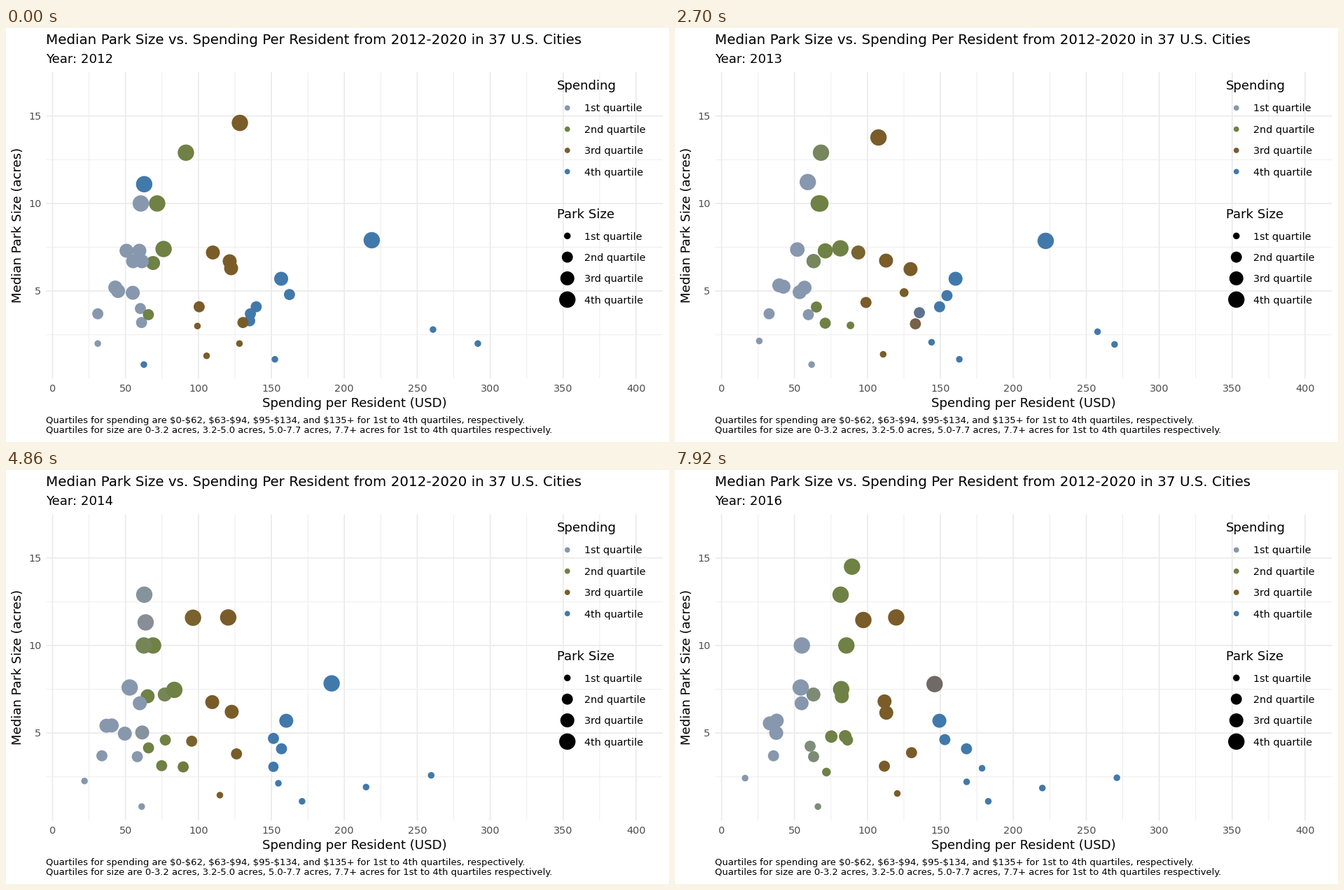
Write a matplotlib script that moves like this. It is 947 by 592 pixels and loops after 8000 ms.

```python
import numpy as np
import matplotlib.pyplot as plt
from matplotlib.animation import FuncAnimation
from matplotlib.collections import LineCollection

WIDTH, HEIGHT, DPI = 947, 592, 64
PT = 72 / DPI                      # points per pixel
INTERVAL, LOOP, STEP = 40, 8000, 180
KEY_STEPS = [0, 12, 25, 37, 50]    # steps at which a calendar year is reached
YEARS = np.arange(5)
COLORS = [(135, 151, 174), (111, 129, 68), (122, 92, 41), (65, 121, 171)]
RADII = np.array([4.75, 7.93, 10.0, 11.7])
QUARTILES = ["1st quartile", "2nd quartile", "3rd quartile", "4th quartile"]
TITLE, BASE, SMALL, CAPTION = 19.93, 18.1, 14.34, 13.15    # text sizes in pixels

plt.rcParams["font.family"] = "DejaVu Sans"

cities = []


def city(x, y, drift, *jumps, swing=0, rise=0):
    """Start at (x, y), drift and rise steadily, swing out and back once.

    A jump (year, dx, dy) moves the city during the year that follows.
    """
    xs = x + drift * YEARS + swing * np.sin(np.pi * YEARS / 4)
    ys = y + rise * YEARS
    for year, dx, *dy in jumps:
        xs = xs + dx * (YEARS > year)
        ys = ys + sum(dy) * (YEARS > year)
    cities.append((xs, ys))


# Large parks
city(128.4, 14.6, -10, (1, 0, -3.6), (2, 0, 3.5), swing=-11)
city(91.4, 12.9, 0, swing=-30)
city(62.8, 11.1, -3, (2, 45), rise=0.1)
city(71.7, 10, 5.3, swing=-15)
city(60.5, 10, -5.5, (0, 14))
city(218.8, 7.9, -33, (0, 44), rise=-0.03)

# Medium parks
city(68.9, 6.6, 5.3, (1, 0, 0.5), swing=-16)
city(109.9, 7.2, -18, (0, 6), (3, 20))
city(76.1, 7.4, 1.2, swing=5, rise=0.03)
city(50.7, 7.3, 1, (1, 0, 0.3))
city(59.5, 7.3, 6.6, (0, 3.5, 0.8), (1, 0, -3.5))
city(55.2, 6.7, 6.4, (0, 0, -1.3), swing=-8, rise=-0.17)
city(61.2, 6.7, -3.6, (0, 6.4))
city(121.4, 6.7, -2, swing=-8, rise=0.03)
city(122.4, 6.3, -7.2, (0, 16), rise=-0.04)
city(156.7, 5.7, 3, (2, -18))
city(162.4, 4.8, -2, swing=-7, rise=-0.05)
city(43, 5.2, -2.8, rise=0.1)
city(44.9, 5, -2, rise=0.2)
city(55, 4.9, -5.6, swing=7, rise=0.03)

# Small parks
city(31, 3.7, 1.3)
city(60.2, 4, -0.5, swing=7, rise=0.07)
city(61, 3.2, 2.2, (3, 0, -0.6), swing=9.5, rise=-0.03)
city(65.7, 3.65, 0, swing=-8)
city(100.5, 4.1, -5, swing=6, rise=0.2)
city(99.3, 3, 5.6, swing=-23, rise=0.03)
city(135.1, 3.3, -3.7, (0, 0, -0.4), (1, 0, 8.7), swing=-7)
city(139.6, 4.1, 8)
city(135.6, 3.7, 3, (1, -16), rise=0.05)
city(130.5, 3.2, 19.8, (0, -22), rise=-0.06)
city(128.1, 2, 11, swing=3, rise=0.06)
city(105.6, 1.3, 4.2, rise=0.07)
city(152.4, 1.1, 8.6)
city(260.8, 2.8, 3.8, swing=-10, rise=-0.1)
city(291.5, 2, 0, (1, -69), swing=-8, rise=-0.04)
city(31, 2, -4.2, rise=0.12)
city(62.6, 0.8, -0.7, (3, 11))


def px(spending):
    return 66.5 + 2.0838 * np.asarray(spending)


def py(size):
    return 501.3 - 25.04 * np.asarray(size)


RGB_TO_XYZ = np.array([[0.4124, 0.3576, 0.1805],
                       [0.2126, 0.7152, 0.0722],
                       [0.0193, 0.1192, 0.9505]])
WHITE = RGB_TO_XYZ.sum(axis=1)
XYZ_TO_LAB = np.array([[0, 116, 0], [500, -500, 0], [0, 200, -200]])


def rgb_to_lab(rgb):
    rgb = np.asarray(rgb) / 255
    linear = np.where(rgb > 0.04045, ((rgb + 0.055) / 1.055) ** 2.4, rgb / 12.92)
    return np.cbrt(linear @ RGB_TO_XYZ.T / WHITE) @ XYZ_TO_LAB.T


def lab_to_rgb(lab):
    xyz = (lab @ np.linalg.inv(XYZ_TO_LAB).T) ** 3 * WHITE
    linear = np.clip(xyz @ np.linalg.inv(RGB_TO_XYZ).T, 0, 1)
    return np.where(linear > 0.0031308, 1.055 * linear ** (1 / 2.4) - 0.055,
                    linear * 12.92)


spending = np.array([c[0] for c in cities])
size = np.array([c[1] for c in cities])
# Values that fall between the whole-dollar bounds land in the last class.
spend_class = np.select([spending <= 62,
                         (spending >= 63) & (spending <= 94),
                         (spending >= 95) & (spending <= 134)], [0, 1, 2], 3)
radius = RADII[np.digitize(size, [3.05, 4.85, 7.35])]
lab = rgb_to_lab(COLORS)[spend_class]

fig = plt.figure(figsize=(WIDTH / DPI, HEIGHT / DPI), dpi=DPI, facecolor="white")
ax = fig.add_axes([0, 0, 1, 1])
ax.set(xlim=(0, WIDTH), ylim=(HEIGHT, 0))
ax.axis("off")


def text(x, y, label, px_size, **kw):
    return ax.text(x, y, label, fontsize=px_size * PT, va="baseline", **kw)


def area(r):
    return (2 * np.asarray(r) * PT) ** 2


def grid(xs, ys, width):
    left, right, top, bottom = 57.5, 938, 63.3, 501.3
    lines = [[(left, y), (right, y)] for y in py(ys)]
    lines += [[(x, top), (x, bottom)] for x in px(xs)]
    ax.add_collection(LineCollection(lines, colors="#ebebeb", linewidths=width * PT,
                                     capstyle="butt", snap=False, zorder=1))


def legend(title, top, colors, radii):
    text(787, top, title, BASE)
    ys = top + 25.8 + 30.35 * np.arange(4)
    ax.scatter([801.8] * 4, ys, s=area(radii), c=colors, linewidths=0, zorder=4)
    for y, label in zip(ys, QUARTILES):
        text(826, y + 5.2, label, SMALL, zorder=5)


grid(range(25, 400, 50), [2.5, 7.5, 12.5], 0.87)
grid(range(0, 401, 50), [5, 10, 15], 1.74)
for value in range(0, 401, 50):
    text(px(value), 520, str(value), SMALL, ha="center", color="#4d4d4d")
for value in (5, 10, 15):
    text(50.5, py(value) + 5.2, str(value), SMALL, ha="right", color="#4d4d4d")

text(57.5, 23, "Median Park Size vs. Spending Per Resident from 2012-2020 "
     "in 37 U.S. Cities", TITLE)
year_text = text(57.5, 50, "", BASE)
text(497.75, 542, "Spending per Resident (USD)", BASE, ha="center")
text(22.5, 282, "Median Park Size (acres)", BASE, ha="center", rotation=90,
     rotation_mode="anchor")
text(57.5, 565, "Quartiles for spending are $0-$62, $63-$94, $95-$134, and $135+ "
     "for 1st to 4th quartiles, respectively.", CAPTION, parse_math=False)
text(57.5, 579, "Quartiles for size are 0-3.2 acres, 3.2-5.0 acres, 5.0-7.7 acres, "
     "7.7+ acres for 1st to 4th quartiles respectively.", CAPTION)
legend("Spending", 88.5, np.array(COLORS) / 255, [3.87] * 4)
legend("Park Size", 271.5, ["black"] * 4, RADII)

dots = ax.scatter(px(spending[:, 0]), py(size[:, 0]), linewidths=0, zorder=3)


def update(frame):
    step = (frame * INTERVAL + INTERVAL // 2) // STEP
    pos = np.interp(step, KEY_STEPS, YEARS)
    i = min(int(pos), 3)
    u = pos - i

    def tween(values):
        return values[:, i] * (1 - u) + values[:, i + 1] * u

    dots.set_offsets(np.column_stack([px(tween(spending)), py(tween(size))]))
    dots.set_sizes(area(tween(radius)))
    dots.set_facecolors(lab_to_rgb(tween(lab)))
    year_text.set_text(f"Year: {int(2012.5 + step * 8 / 99)}")
    return dots, year_text


anim = FuncAnimation(fig, update, frames=LOOP // INTERVAL, interval=INTERVAL,
                     repeat=True, repeat_delay=0)
plt.show()
```
